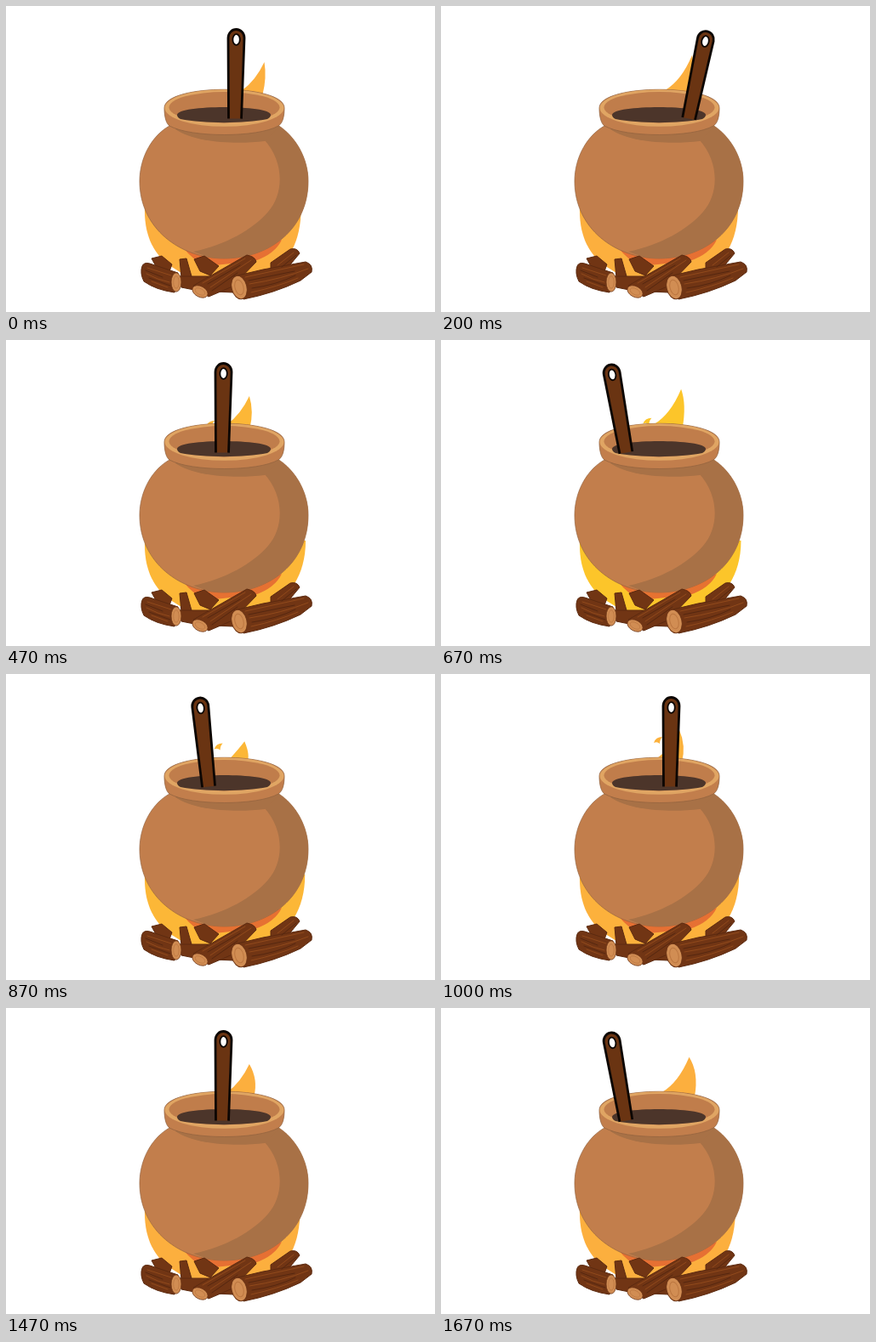
Recreate the animation shown at these times as an HTML page. Size 504 by 360 pixels, loop 1790 ms.

```html
<!DOCTYPE html>
<html lang="en">
<head>
<meta charset="utf-8">
<title>Clay pot on a fire</title>
<style>
  html, body { margin: 0; width: 100%; height: 100%; overflow: hidden; background: #fff; }
  svg { display: block; width: 504px; height: 360px; }
  .bark { fill: #713514; stroke: #5c2a10; stroke-linejoin: round; }
  .grain { fill: none; stroke: #914a1c; stroke-linecap: round; }
  .crack { fill: none; stroke: #552710; stroke-linecap: round; }
</style>
</head>
<body>
<svg viewBox="0 0 504 360">
  <defs>
    <path id="body" d="M194 140C172 151 157 178 157 206C157 262 205 297 256 297C310 297 355 262 355 206C355 179 340 153 319 140Z"/>
    <clipPath id="inside"><use href="#body"/></clipPath>
    <g id="cut">
      <ellipse rx="9" ry="14" fill="#d18d53" stroke="#6b3314"/>
      <ellipse rx="5" ry="9" fill="none" stroke="#bb7640"/>
    </g>
  </defs>

  <g id="fire">
    <path id="wisp"/>
    <path id="ember" d="M-5 3Q-3-4 5-4Q2-1 2 4Q-1 1-5 3Z"/>
    <path id="base"/>
  </g>
  <path fill="#e46a32" opacity=".9" d="M208 284Q262 300 324 275Q316 292 292 300L236 306Q220 300 208 284Z"/>

  <g id="pot">
    <use href="#body" fill="#c27e4c" stroke="#94643f" stroke-width=".7"/>
    <g clip-path="url(#inside)" fill="#a87146">
      <path d="M303 157C327 183 327 220 308 242C290 263 258 281 220 289L256 302L360 300V150L318 138Z"/>
      <path d="M199 145C222 161 270 163 304 159L322 142L300 130H205Z"/>
    </g>
    <path fill="#c27e4c" stroke="#94643f" stroke-width=".8" d="M186 120C186 91 327 91 327 120C327 130 325 138 320 141C296 155 217 155 192 141C188 138 186 130 186 120Z"/>
    <ellipse cx="256.5" cy="120" rx="70" ry="21.8" fill="#e0a563"/>
    <ellipse cx="256.5" cy="119.2" rx="65" ry="18.2" fill="#c07d4b"/>
    <path fill="#4c352a" d="M201 128C201 116 311 116 311 128C311 130 309 132 307 133C280 138.500 232 138.500 205 133Q201 131 201 128Z"/>
  </g>

  <g id="spoon">
    <path fill="#6a3412" d="M-7.500 0L-9-95A9 9 0 0 1 10-95L7.500 0Z"/>
    <path fill="none" stroke="#0c0603" stroke-width="2.8" d="M-7.500 0L-9-95A9.500 10 0 0 1 10-95L7.500 0"/>
    <ellipse cx=".6" cy="-93" rx="4.200" ry="6.400" fill="#fff" stroke="#0c0603" stroke-width="1.800"/>
  </g>

  <g id="logs">
    <path class="bark" d="M171 297L183 294L195 304L192 312L176 306Z"/>
    <path class="bark" d="M204 298L212 297L218 318L206 320Z"/>
    <path class="bark" d="M221 298L233 294L250 306L240 317L228 312Z"/>
    <path class="bark" d="M311 302L334 286Q342 284 345 291L330 309L311 314Z"/>
    <path class="bark" d="M204 318H236L270 318L267 337L226 335L206 331Z"/>
    <path class="bark" d="M160 306Q162 301 169 303L202 314L198 337Q176 334 162 324Q157 314 160 306Z"/>
    <path class="grain" d="M166 308L194 317M165 315Q178 322 192 325M171 324L190 331"/>
    <path class="crack" d="M164 311L184 319M168 320L193 329"/>
    <path class="bark" d="M220 329L283 293Q293 295 294 301L266 330L238 342Z"/>
    <path class="grain" d="M231 326L281 297M240 331L288 299"/>
    <path class="crack" d="M237 327L275 305M242 335L272 314"/>
    <path class="bark" d="M268 318L302 310L352 301Q361 304 359 313L346 323Q315 338 279 345Z"/>
    <path class="grain" d="M281 319L350 304M286 327Q325 321 355 309M288 337Q320 330 343 320M319 305L338 290"/>
    <path class="crack" d="M285 323L339 312M289 332Q318 328 340 317M324 307L341 293"/>
    <use href="#cut" transform="translate(200 325) scale(.66 .8)"/>
    <use href="#cut" transform="translate(228 336) rotate(-62) scale(.7)"/>
    <use href="#cut" transform="translate(274 331) rotate(-14)"/>
  </g>
</svg>

<script>
const LOOP = 1790, STEPS = 18;
const { PI, sin, cos, exp, round } = Math;
const [wisp, ember, base, fire, spoon] =
  ['wisp', 'ember', 'base', 'fire', 'spoon'].map(id => document.getElementById(id));

// ten poses a second, snapped to a 15 Hz clock and to whole 10 ms
const start = k => 10 * round(round(1.49 * k + .04) * 20 / 3);

function stir(k) {
  const a = k * PI / 5;
  // the foot swings around the pot and lingers right of centre at the turn
  const foot = 254 + 38.5 * sin(a) + 15 * cos(a / 2) ** 16;
  spoon.setAttribute('transform', `translate(${foot} 132.500) rotate(${.6 + 11.6 * sin(a)})`);
}

function burn(k) {
  const x = 280 + .235 * (k - 10) ** 2;
  const rise = 14 * sin(.4 * PI * k);
  const y = 66 - rise;
  const left = x - 26 - .7 * rise;
  const right = x - 2 + k / 2;
  const side = 349 + 3.5 * sin((k - 2) * PI / 9);
  const flare = exp(-(((k - 7) / 2) ** 2));
  const drift = (k - 5) ** 2;

  wisp.setAttribute('d', `M${left} 99Q${left + .6 * (x - left)} 88 ${x} ${y}Q${right + 5} ${y + 18} ${right} 104L${left} 108Z`);
  ember.setAttribute('transform', `translate(${240 + .6 * drift} ${99 - .84 * drift})`);
  ember.setAttribute('opacity', k >= 5 && k <= 10 ? 1 : 0);
  base.setAttribute('d', `M163 236C162 268 172 289 190 304L214 319H306C332 302 ${side} 278 ${side} 236Z`);
  fire.setAttribute('fill', `rgb(252 ${round(175 + 22 * flare)} ${round(62 - 20 * flare)})`);
}

let shown = -1;
function frame() {
  const t = performance.now() % LOOP;
  let k = STEPS - 1;
  while (start(k) > t) k--;
  if (k !== shown) {
    shown = k;
    stir(k);
    burn(k);
  }
  requestAnimationFrame(frame);
}
frame();
</script>
</body>
</html>
```
